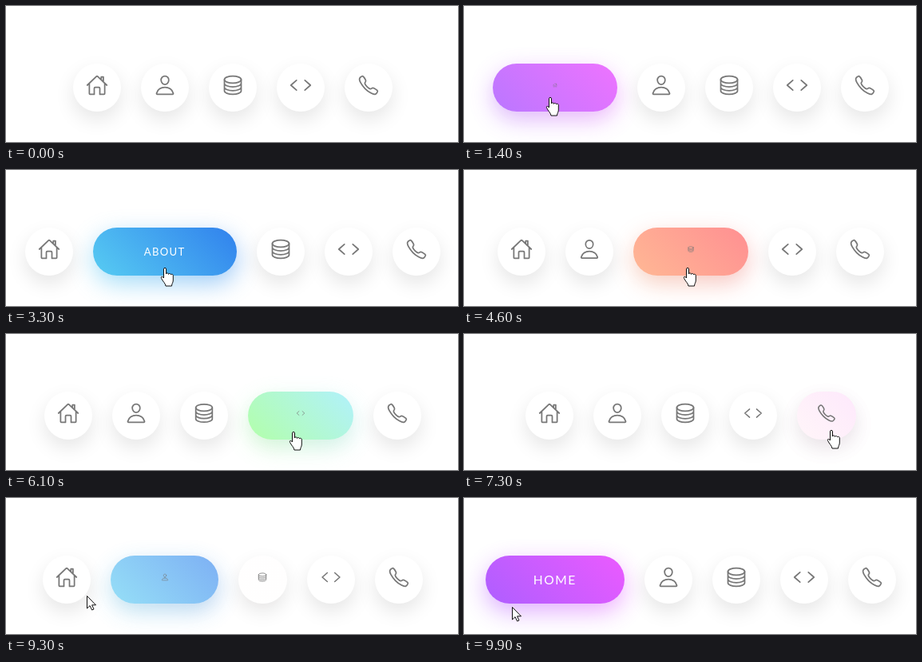
An HTML page that plays this animation: 566 px wide and 170 px high, repeating every 10 s.

```html
<!DOCTYPE html>
<html lang="en">
<head>
<meta charset="utf-8">
<title>Gradient menu</title>
<style>
  html, body { margin: 0; width: 100%; height: 100%; overflow: hidden; background: #fff; }
  ul {
    position: absolute; left: 0; top: 72px; width: 568px; margin: 0; padding: 0;
    display: flex; justify-content: center; gap: 25px; list-style: none; isolation: isolate;
  }
  li {
    --open: 0; --icon: 1; --title: 0;
    position: relative; flex: none; height: 60px; width: calc(60px + 120px * var(--open));
    border-radius: 60px; background: #fff;
    box-shadow: 0 10px 25px rgba(0, 0, 0, calc(.1 * (1 - var(--open))));
  }
  li::before, li::after {
    content: ""; position: absolute; inset: 0; border-radius: 60px;
    background: linear-gradient(45deg, var(--from), var(--to)); opacity: var(--open);
  }
  li::after { top: 10px; bottom: -10px; z-index: -1; filter: blur(15px); opacity: calc(.5 * var(--open)); }
  li svg {
    position: absolute; z-index: 1; left: calc(50% - 14px); top: 12.5px; width: 28px; height: 28px;
    fill: none; stroke: #777; stroke-width: 32; stroke-linecap: round; stroke-linejoin: round;
    transform: scale(var(--icon));
  }
  li span {
    position: absolute; z-index: 1; inset: 0; display: flex; align-items: center; justify-content: center;
    font: 19.2px/1 Lato, sans-serif; letter-spacing: .1em; color: #fff; text-transform: uppercase;
    transform: scale(var(--title));
  }
  #cursor { position: absolute; left: 0; top: 0; width: 1px; height: 1px; overflow: visible; }
  #cursor path { fill: #fff; stroke: #111; stroke-linejoin: round; }
</style>
</head>
<body>
<ul>
  <li style="--from:#a955ff; --to:#ea51ff">
    <svg viewBox="0 0 512 512"><path d="M80 212v236a16 16 0 0 0 16 16h96V328a24 24 0 0 1 24-24h80a24 24 0 0 1 24 24v136h96a16 16 0 0 0 16-16V212M480 256L267 52c-5-5-17-5-22 0L32 256M400 179V64h-48v69"/></svg>
    <span>Home</span>
  </li>
  <li style="--from:#56ccf2; --to:#2f80ed">
    <svg viewBox="0 0 512 512"><path d="M344 144c-4 53-44 96-88 96s-84-43-88-96c-4-55 35-96 88-96s92 42 88 96zM256 304c-87 0-175 48-192 139-2 11 5 21 16 21h352c11 0 18-10 16-21C431 352 343 304 256 304z"/></svg>
    <span>About</span>
  </li>
  <li style="--from:#ff9966; --to:#ff5e62">
    <svg viewBox="0 0 512 512"><ellipse cx="256" cy="128" rx="192" ry="80"/><path d="M448 214a192 80 0 0 1-384 0M448 300a192 80 0 0 1-384 0M64 128v256a192 80 0 0 0 384 0V128"/></svg>
    <span>Skills</span>
  </li>
  <li style="--from:#80ff72; --to:#7ee8fa">
    <svg viewBox="0 0 512 512"><path d="M160 368L32 256l128-112M352 368l128-112-128-112"/></svg>
    <span>Projects</span>
  </li>
  <li style="--from:#ffa9c6; --to:#f434e2">
    <svg viewBox="0 0 512 512"><path d="M451 374c-16-16-54-39-73-49-24-12-26-13-45 1-13 9-21 18-36 15s-47-21-76-50-47-61-50-76 5-23 15-36c13-18 12-21 1-45-9-19-33-57-49-73-18-17-18-14-29-10q-14 6-26 14c-16 11-25 20-31 33s-9 44 23 102 55 88 101 135 83 71 135 101c65 36 90 29 103 23s22-15 33-31q8-12 14-26c5-11 8-11-9-28z"/></svg>
    <span>Contact</span>
  </li>
</ul>
<svg id="cursor"><path/></svg>
<script>
const LOOP = 10000, STEP = 100, DURATION = 500, DELAY = 250;
const ARROW = 'M.5 .5V16l3.6-3.4L6.6 18l2.4-1-2.4-5.2h4.9z';
const HAND = 'M-1.5 13V1.9a1.5 1.5 0 0 1 3 0V8c0-1.5 3-1.5 3 .4 0-1.4 3-1.2 3 .6 0-1.2 2.8-1 2.8 .8V16c0 3-1.8 4-1.8 7H1c0-3-4-6-5.4-9.6C-5.4 11-3 10.6-1.5 13z';

// Alternating enter and leave times for each menu item
const hovers = [
  [1150, 2350, 9325, 9865],
  [2850, 3950, 9090, 9280],
  [4395, 5430, 8900, 9060],
  [5925, 6780, 8615, 8840],
  [7245, 8545],
];

// Pointer waypoints: time, x, y
const route = [
  [800, 136, 166], [1000, 110, 152], [1100, 110, 152], [1200, 109, 124], [1400, 108, 114],
  [2200, 108, 114], [2350, 140, 134], [2600, 180, 142], [2850, 192, 131], [2950, 198, 122],
  [3800, 200, 122], [3950, 216, 134], [4200, 262, 142], [4395, 279, 131], [4500, 280, 122],
  [5300, 281, 122], [5430, 300, 134], [5750, 345, 142], [5925, 358, 131], [6050, 360, 122],
  [6650, 361, 122], [6780, 376, 134], [7050, 440, 142], [7245, 458, 130], [7300, 460, 120],
  [8200, 460, 120], [8545, 363, 121], [8700, 320, 120], [9330, 90, 122], [9700, 62, 125], [9900, 60, 136],
];

const items = [...document.querySelectorAll('li')];
const cursor = document.getElementById('cursor');
const pointer = cursor.firstChild;
const clamp = x => Math.min(1, Math.max(0, x));

// CSS "ease": cubic-bezier(.25, .1, .25, 1)
function ease(x) {
  if (x <= 0 || x >= 1) return clamp(x);
  let low = 0, high = 1, s;
  for (let i = 0; i < 24; i++) {
    s = (low + high) / 2;
    if (.75 * s - .75 * s * s + s ** 3 < x) low = s; else high = s;
  }
  return .3 * s * (1 - s) ** 2 + 3 * s * s * (1 - s) + s ** 3;
}

// Value of a reversible transition that flips at each toggle time
function transition(toggles, time, delayIn, delayOut) {
  let from = 0, to = 0, start = 0, duration = 1;
  const valueAt = t => from + (to - from) * ease((t - start) / duration);
  for (const toggle of toggles) {
    if (toggle > time) break;
    from = valueAt(toggle);
    to = 1 - to;
    start = toggle + (to ? delayIn : delayOut);
    duration = Math.max(1, DURATION * Math.abs(to - from));
  }
  return valueAt(time);
}

function pointerAt(time) {
  const next = route.findIndex(point => point[0] > time);
  if (next < 0) return route.at(-1).slice(1);
  const [t0, x0, y0] = route[Math.max(0, next - 1)], [t1, x1, y1] = route[next];
  const k = clamp((time - t0) / (t1 - t0 || 1));
  return [x0 + (x1 - x0) * k, y0 + (y1 - y0) * k];
}

function draw(time) {
  let hovering = false;
  items.forEach((item, i) => {
    const toggles = hovers[i];
    if (toggles.filter(t => t <= time).length % 2) hovering = true;
    item.style.setProperty('--open', transition(toggles, time, 0, 0).toFixed(4));
    item.style.setProperty('--icon', (1 - transition(toggles, time, 0, DELAY)).toFixed(4));
    item.style.setProperty('--title', transition(toggles, time, DELAY, 0).toFixed(4));
  });
  const [x, y] = pointerAt(time);
  cursor.style.display = time < route[0][0] ? 'none' : 'block';
  cursor.style.transform = `translate(${Math.round(x)}px, ${Math.round(y)}px)`;
  pointer.setAttribute('d', hovering ? HAND : ARROW);
}

function frame() {
  draw(Math.floor(performance.now() % LOOP / STEP) * STEP);
  requestAnimationFrame(frame);
}
frame();
</script>
</body>
</html>
```
